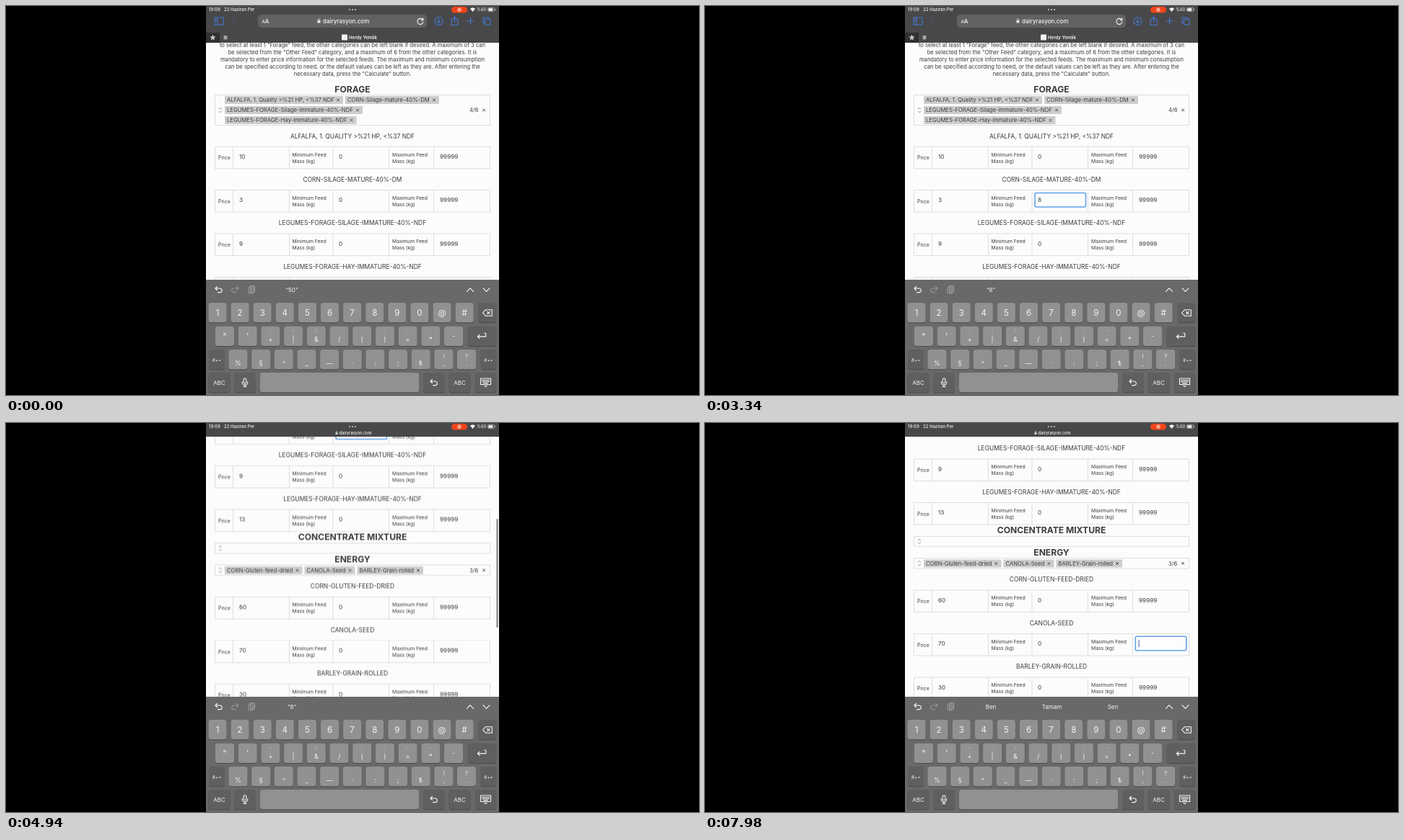
Write an HTML page that moves like this. It is 960 px wide and 540 px high and loops after 8000 ms.

```html
<!DOCTYPE html>
<html lang="en">
<head>
<meta charset="utf-8">
<title>Ration form</title>
<style>
html, body { margin: 0; width: 100%; height: 100%; overflow: hidden; background: #000; }
svg { display: block; width: 960px; height: 540px; }
text { font-family: Inter, "Open Sans", sans-serif; fill: #3c3c3e; }
.mid { text-anchor: middle; }
.line { fill: none; stroke: #dedee0; }
.icon { fill: none; stroke: #f8f8f8; stroke-width: 1.1; stroke-linecap: round; stroke-linejoin: round; }
.blue { stroke: #4478d2; }
.ui text { fill: #f4f4f4; }
.scroll { animation: scroll 8s infinite; }
.thumb { animation: thumb 8s infinite, thumbFade 8s linear infinite; }
.bar { animation: bar 8s infinite; }
.tools { animation: tools 8s linear infinite; }
.compact { animation: compact 8s linear infinite; }
@keyframes scroll {
  0%, 51.6% { transform: translateY(0); animation-timing-function: cubic-bezier(.25,.3,.65,.8); }
  56.25% { transform: translateY(-196px); animation-timing-function: cubic-bezier(.25,.58,.6,.88); }
  61.75% { transform: translateY(-256.5px); animation-timing-function: cubic-bezier(.2,.5,.5,1); }
  69%, 100% { transform: translateY(-266px); }
}
@keyframes thumb {
  0%, 51.6% { transform: translateY(0); animation-timing-function: cubic-bezier(.25,.3,.65,.8); }
  56.25% { transform: translateY(55px); animation-timing-function: cubic-bezier(.25,.58,.6,.88); }
  61.75% { transform: translateY(72px); animation-timing-function: cubic-bezier(.2,.5,.5,1); }
  69%, 100% { transform: translateY(75px); }
}
@keyframes thumbFade { 0%, 51.5% { opacity: 0; } 52%, 73% { opacity: 1; } 77%, 100% { opacity: 0; } }
@keyframes bar { 0%, 51.6% { transform: none; } 54%, 100% { transform: translateY(-32px); } }
@keyframes tools { 0%, 51.6% { opacity: 1; } 53%, 100% { opacity: 0; } }
@keyframes compact { 0%, 52.4% { opacity: 0; } 54%, 100% { opacity: 1; } }
</style>
</head>
<body>
<svg id="stage" viewBox="0 0 960 540"></svg>
<script>
const LOOP = 8000;
let rules = '', spans = 0;

const text = (x, y, size, str, attrs = '') =>
  `<text x="${x}" y="${y}" font-size="${size}" ${attrs}>${str}</text>`;
const mid = (x, y, size, str, attrs = '') => text(x, y, size, str, `class="mid" ${attrs}`);
const rect = (x, y, w, h, fill, r = 0, attrs = '') =>
  `<rect x="${x}" y="${y}" width="${w}" height="${h}" rx="${r}" fill="${fill}" ${attrs}/>`;
const icon = (x, y, d, cls = '', attrs = '') =>
  `<path class="icon ${cls}" transform="translate(${x} ${y})" d="${d}" ${attrs}/>`;
const box = (x, y, w, h) => `<rect class="line" x="${x}" y="${y}" width="${w}" height="${h}"/>`;

// Shows content only between two times (ms) of the loop.
function during(from, to, content) {
  const name = 'span' + spans++;
  const at = (ms, o) => `${ms / LOOP * 100}%{opacity:${o}}`;
  rules += `@keyframes ${name}{${from > 0 ? at(0, 0) : ''}${at(from, 1)}${at(to, to < LOOP ? 0 : 1)}` +
    `${to < LOOP ? at(LOOP, 0) : ''}}`;
  return `<g style="animation:${name} ${LOOP}ms step-end infinite">${content}</g>`;
}

const number = (x, y, v) => text(x, y + 16.5, 8.2, v);

function feed(y, title, price, min = '0', max = '99999') {
  const label = (x, word) =>
    text(x, y + 13.3, 6.8, word + ' Feed') + text(x, y + 22.3, 6.8, 'Mass (kg)');
  const columns = [314.5, 392.5, 453, 530.5, 592.5].map(x => `M${x} ${y}v30.5`).join('');
  return mid(480, y - 11.8, 8.45, title) +
    box(289.5, y, 381, 30.5) + `<path class="line" d="${columns}"/>` +
    text(294, y + 18, 6.9, 'Price') + number(323, y, price) +
    label(396.5, 'Minimum') + number(461, y, min) +
    label(535, 'Maximum') + number(601, y, max);
}

const cross = (x, y) =>
  `<path d="M${x - 1.8} ${y - 1.8}l3.6 3.6m0-3.6l-3.6 3.6" stroke="#3c3c3e" stroke-width=".9"/>`;
const chip = (x, y, w, str) =>
  rect(x, y, w, 11, '#cdcdce', 1) + text(x + 3, y + 8.2, 7.7, str) + cross(x + w - 7, y + 5.5);

function picker(y, h, heading, count, chips = '') {
  const c = y + h / 2;
  return mid(480, y - 4, 12.1, heading, 'font-weight="700"') + box(289.5, y, 381, h) +
    `<path d="M295 ${c - 1.3}l2-2 2 2m0 2.6l-2 2-2-2" fill="none" stroke="#88888a" stroke-width=".9"/>` +
    (count ? text(642, c + 2.8, 7.7, count) + cross(662, c) : '') + chips;
}

const intro = [
  'to select at least 1 "Forage" feed, the other categories can be left blank if desired. A maximum of 3 can',
  'be selected from the "Other Feed" category, and a maximum of 6 from the other categories. It is',
  'mandatory to enter price information for the selected feeds. The maximum and minimum consumption',
  'can be specified according to need, or the default values can be left as they are. After entering the',
  'necessary data, press the "Calculate" button.'
].map((str, i) => mid(480, 57.2 + i * 10.05, 7.6, str)).join('');

const ring = (x, y) =>
  rect(x, y, 70.5, 19.5, '#fdfdfe', 2, 'stroke="#62a3ea" stroke-width="1.6"');
const caret = (x, y, from, to) => during(from, to, rect(x, y, 1.2, 10.5, '#5b7cb4'));
const press = (x, y) => rect(x, y, 72.3, 21.3, '#b0b0b2', 2);

const CORN = 255.5, CANOLA = 558.5;
const FOCUS = 900, CLEARED = 1400, TYPED = 2500, PRESS = 5560, REFOCUS = 5800, ERASE = 6400, EMPTY = 7300;

// The five nines, deleted one by one.
const eraseStep = (EMPTY - ERASE) / 4;
const nines = [5, 4, 3, 2, 1].map(n => ({
  n,
  from: n === 5 ? REFOCUS : ERASE + (4 - n) * eraseStep,
  to: ERASE + (5 - n) * eraseStep
}));

const cornField =
  during(740, FOCUS, press(456, CORN + 3)) +
  during(FOCUS, REFOCUS, ring(457, CORN + 4)) +
  during(0, CLEARED, number(461, CORN, '0')) +
  during(TYPED, LOOP, number(461, CORN, '8')) +
  caret(466.3, CORN + 8.3, FOCUS, CLEARED) + caret(461, CORN + 8.3, CLEARED, TYPED) +
  [0, 1, 2].map(i => caret(465.8, CORN + 8.3, TYPED + i * 1000, TYPED + i * 1000 + 500)).join('');

const canolaField =
  during(PRESS, REFOCUS, press(595, CANOLA + 2.5)) +
  during(REFOCUS, LOOP, ring(596.3, CANOLA + 3.7)) +
  during(0, REFOCUS, number(601, CANOLA, '99999')) +
  nines.map(s => during(s.from, s.to, number(601, CANOLA, '9'.repeat(s.n))) +
    caret(601 + s.n * 5.15, CANOLA + 8.3, s.from, s.to)).join('') +
  caret(600.5, CANOLA + 8.3, EMPTY, LOOP);

const page = rect(277, 0, 406, 540, '#fcfcfd') + `<g class="scroll">` + intro +
  picker(123.5, 42, 'FORAGE', '4/6',
    chip(303, 125, 164, 'ALFALFA, 1. Quality &gt;%21 HP, &lt;%37 NDF') +
    chip(470, 125, 130, 'CORN-Silage-mature-40%-DM') +
    chip(303, 139, 191, 'LEGUMES-FORAGE-Silage-immature-40%-NDF') +
    chip(303, 153, 182.5, 'LEGUMES-FORAGE-Hay-immature-40%-NDF')) +
  feed(195.3, 'ALFALFA, 1. QUALITY &gt;%21 HP, &lt;%37 NDF', 10) +
  feed(CORN, 'CORN-SILAGE-MATURE-40%-DM', 3, '') + cornField +
  feed(316, 'LEGUMES-FORAGE-SILAGE-IMMATURE-40%-NDF', 9) +
  feed(376.5, 'LEGUMES-FORAGE-HAY-IMMATURE-40%-NDF', 13) +
  picker(423.3, 14, 'CONCENTRATE MIXTURE') +
  picker(453.5, 14.5, 'ENERGY', '3/6',
    chip(303, 455.5, 107.5, 'CORN-Gluten-feed-dried') +
    chip(413.5, 455.5, 70, 'CANOLA-Seed') +
    chip(486.5, 455.5, 91.5, 'BARLEY-Grain-rolled')) +
  feed(498, 'CORN-GLUTEN-FEED-DRIED', 60) +
  feed(CANOLA, 'CANOLA-SEED', 70, '0', '') + canolaField +
  feed(619, 'BARLEY-GRAIN-ROLLED', 30) + `</g>` +
  rect(679.5, 61, 2, 151, '#78787a', 1, 'class="thumb"');

const lock = (x, y, s) => `<g transform="translate(${x} ${y}) scale(${s})">` +
  rect(-2, -.5, 4, 3.5, '#e6e6e6', .6) +
  `<path d="M-1.2 0v-1.6a1.2 1.2 0 0 1 2.4 0v1.6" fill="none" stroke="#e6e6e6" stroke-width=".8"/></g>`;

const toolbar = `<g class="bar">` + rect(277, -20, 406, 71, '#48484a') +
  `<g class="tools">` + rect(277, 37, 19, 14, '#303032') +
  icon(295, 21, 'M-6-5h12v10h-12zM-2-5v10M-4.5-2.5h1M-4.5-.5h1', 'blue') +
  icon(316, 21, 'M1.5-4l-4 4 4 4', 'blue', 'opacity=".25"') +
  rect(349, 12, 234, 18, '#626264', 5) +
  text(354.5, 24, 6, 'A', 'font-weight="500"') + text(358.8, 24, 8, 'A', 'font-weight="500"') +
  lock(433.5, 20.5, 1) + text(439, 24, 8, 'dairyrasyon.com', 'font-weight="500"') +
  icon(574, 21, 'M3.5-1.5a4 4 0 1 0 .4 2.5M3.8-4.2v2.8h-2.8') +
  icon(599.5, 21, 'M5.5 0a5.5 5.5 0 1 1-11 0a5.5 5.5 0 1 1 11 0M0-3v5.5m-2-2l2 2 2-2', 'blue') +
  icon(621.5, 21, 'M-2-2.5h-2.5v8h9v-8h-2.5M0 2v-8m-2.2 2.2l2.2-2.2 2.2 2.2', 'blue') +
  icon(643.5, 21, 'M-4.5 0h9M0-4.5v9', 'blue') +
  icon(666, 21, 'M-2.5-2.5h7.5v7.5h-7.5zM-2.5 2.5h-2.5v-7.5h7.5v2.5', 'blue') +
  `<path fill="#c4c4c6" d="M286.5 39.5l1.2 2.8 3 .3-2.3 2 .7 3-2.6-1.6-2.6 1.6.7-3-2.3-2 3-.3z"/>` +
  rect(301.5, 41, 5, 5.5, '#a2a2a4', 1) + rect(465, 39.5, 8, 8, '#f2f2f2', 1) +
  text(475, 46, 6.1, 'Herdy Yemlik', 'font-weight="600"') + `</g></g>`;

const status = `<g class="compact">` + lock(458, 13.5, .75) +
  text(461.5, 15.7, 5.6, 'dairyrasyon.com', 'font-weight="500"') + `</g>` +
  text(281, 7.3, 6, '19:09', 'font-weight="500"') +
  text(302, 7.3, 6, '22 Haziran Per', 'font-weight="500"') +
  [476, 480, 484].map(x => `<circle cx="${x}" cy="5" r="1" fill="#d2d2d2"/>`).join('') +
  rect(617, 1, 22, 8.5, '#f0441a', 4.2) +
  `<circle cx="628" cy="5.2" r="2.3" fill="none" stroke="#fff" stroke-width=".8"/><circle cx="628" cy="5.2" r="1" fill="#fff"/>` +
  `<path fill="#f4f4f4" d="M643 3.8q3.5-3 7 0l-3.5 4.2z"/>` +
  text(652, 7.3, 6, '%60') +
  rect(667.5, 2.5, 9, 5, 'none', 1.3, 'stroke="#c0c0c0" stroke-width=".7"') +
  rect(668.3, 3.3, 6, 3.4, '#f4f4f4', .7) + rect(677.2, 4, .9, 2, '#c0c0c0');

const KEY = '#919193', DARK = '#5f5f61';
const key = (cx, y, w, fill = KEY) =>
  rect(cx - w / 2, y + .8, w, 27.5, '#4a4a4c', 3.5) + rect(cx - w / 2, y, w, 27.3, fill, 3.5);
const keyRow = (chars, x0, pitch, y, w, glyph) =>
  [...chars].map((c, i) => key(x0 + i * pitch, y, w) + glyph(x0 + i * pitch, c, i)).join('');
const esc = c => c === '&' ? '&amp;' : c;
const special = (cx, y, w, label, size = 8) => key(cx, y, w, DARK) + mid(cx, y + 16.7, size, label);
const uturn = 'M-2.5-4.5l-2.5 2.5 2.5 2.5M-5-2h6.5a2.8 2.8 0 0 1 0 5.6h-3';

const suggest = (from, to, ...words) =>
  during(from, to, words.map((w, i) => mid(396 + i * 84.5, 397, 8, w)).join(''));
const words = ['Ben', 'Tamam', 'Sen'];

const keyboard = rect(277, 380, 406, 160, '#69696b') +
  icon(295, 394, uturn) +
  icon(317, 394, uturn, '', 'opacity=".3" style="transform:translate(317px,394px) scaleX(-1)"') +
  rect(336, 390, 6, 9, 'none', 1, 'stroke="#a0a0a2"') +
  rect(338.5, 388.5, 6, 9, '#828284', 1, 'stroke="#aaaaac" stroke-width=".8"') +
  icon(643, 394, 'M-4.5 2.3l4.5-4.6 4.5 4.6') + icon(665.5, 394, 'M-4.5-2.3l4.5 4.6 4.5-4.6') +
  suggest(0, FOCUS, '“50”') + suggest(FOCUS, CLEARED, '“0”') + suggest(CLEARED, TYPED, ...words) +
  suggest(TYPED, REFOCUS, '“8”') + suggest(EMPTY, LOOP, ...words) +
  nines.map(s => suggest(s.from, s.to, `“${'9'.repeat(s.n)}”`)).join('') +
  keyRow('1234567890@#', 293, 31.1, 412, 25, (x, c) => mid(x, 430, 11.5, c)) +
  key(667, 412, 24.5, DARK) + icon(667, 426, 'M-6.5 0l3.8-4.2h9v8.4h-9zM-.5-1.7l3.6 3.4m0-3.4l-3.6 3.4') +
  keyRow('"\'+|&/()=*-', 303, 31.7, 444.8, 26, (x, c, i) =>
    mid(x, i < 2 ? 463 : i === 10 ? 461 : 466, i < 2 ? 12 : 9, esc(c)) +
    (i > 1 && i < 10 ? mid(x, 453, 5.5, '×\\$÷[]≠•'[i - 2], 'opacity=".3"') : '')) +
  key(659.5, 444.8, 39.5, DARK) + icon(659, 458.5, 'M-3-2.2l-2.7 2.6 2.7 2.6M-5.7.4h11.4v-4.6h-2') +
  special(292, 477, 22, '#+=', 6.3) +
  keyRow('%§^_—·:;₺,.', 321.5, 31.65, 477, 26, (x, c, i) =>
    mid(x, 499, 9, c) + (i > 8 ? mid(x, 488.5, 8, '!?'[i - 9]) : '')) +
  special(668.5, 477, 21.5, '#+=', 6.3) +
  special(295.5, 509, 30, 'ABC') + key(331, 509, 30, DARK) +
  icon(331, 522.5, 'M-1.8-4a1.8 1.8 0 0 1 3.6 0v3.5a1.8 1.8 0 0 1-3.6 0zM-3.8-1v.8a3.8 3.8 0 0 0 7.6 0v-.8M0 3.6v2.4m-2 0h4') +
  key(462, 509, 220) +
  key(593, 509, 30, DARK) + icon(593, 523, uturn) + special(628.5, 509, 30, 'ABC') +
  key(664.5, 509, 29.5, DARK) +
  icon(664.5, 522, 'M-7-5h14v8.5h-14zM-5-2.5h10M-5-.5h10M-3 1.6h6M-1.7 5.2l1.7 1.4 1.7-1.4');

document.getElementById('stage').innerHTML =
  `<defs><clipPath id="screen"><rect x="277" y="0" width="406" height="540"/></clipPath></defs>` +
  `<g clip-path="url(#screen)">${page}<g class="ui">${toolbar}${status}${keyboard}</g></g>`;
document.head.appendChild(document.createElement('style')).textContent = rules;
</script>
</body>
</html>
```
